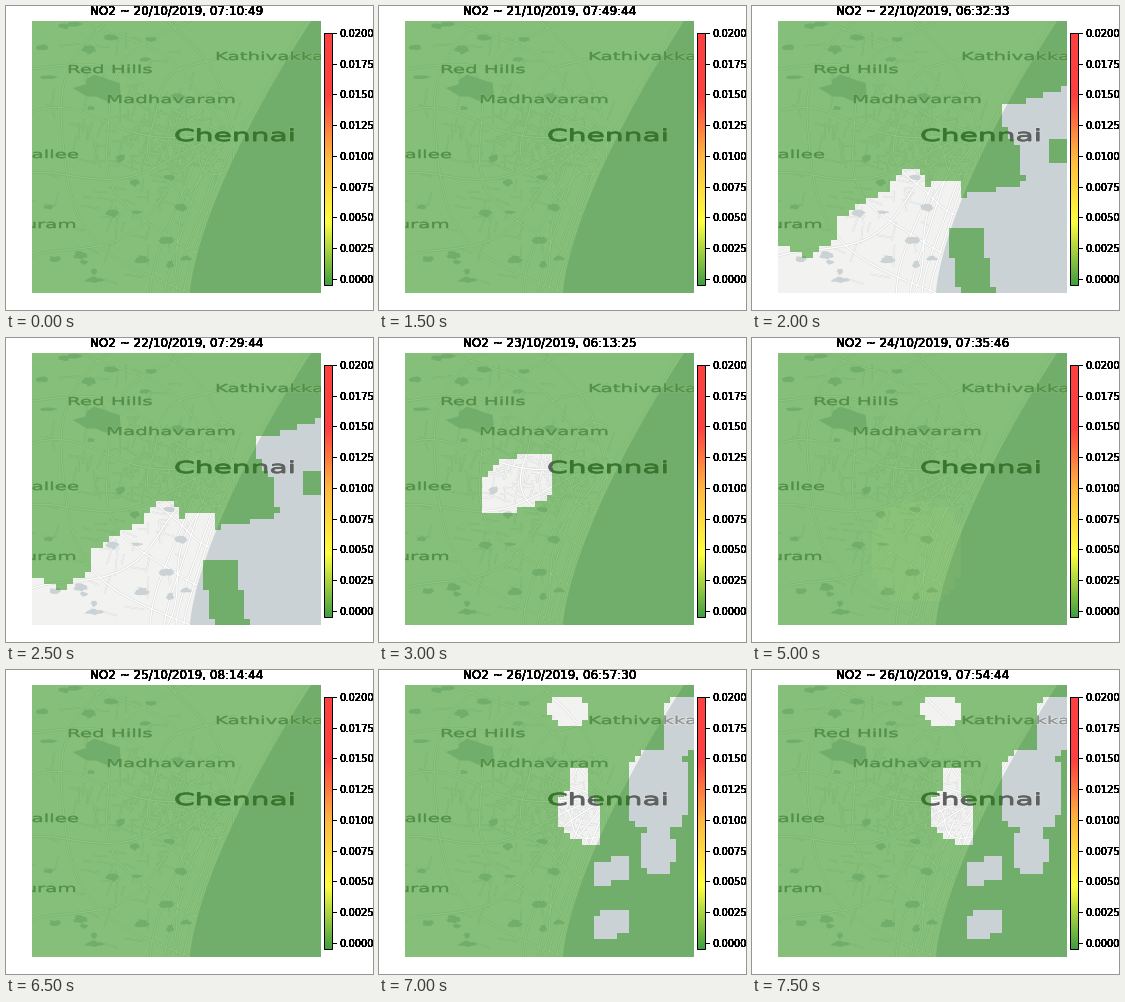
Animation of 367x304 px, one loop 8 s. Source, as a matplotlib script:

```python
import numpy as np
import matplotlib.pyplot as plt
from matplotlib.animation import FuncAnimation
from matplotlib.colors import LinearSegmentedColormap
from matplotlib.patches import PathPatch, Polygon, Rectangle
from matplotlib.path import Path
from matplotlib.textpath import TextPath
from matplotlib.transforms import Affine2D

W, H, DPI = 367, 304, 64
PT = 72 / DPI                       # points per pixel
X0, X1, Y0, Y1 = 26, 315, 15, 287   # map box
COLS, ROWS = 49, 46
VMIN, VMAX = -0.0005, 0.02
STRETCH = 1.8                       # horizontal scale of the map projection
LAND, SEA, ROAD, EDGE, GREY = "#f2f3f1", "#cad2d5", "#ffffff", "#d8dad9", "#8f9391"

plt.rcParams["font.family"] = "DejaVu Sans"
rng = np.random.default_rng(7)
cmap = LinearSegmentedColormap.from_list(
    "no2", ["green", "yellow", "orange", "red", "red"])

fig = plt.figure(figsize=(W / DPI, H / DPI), dpi=DPI, facecolor="white")
ax = fig.add_axes([0, 0, 1, 1])
ax.axis("off")
frame = Rectangle((X0, Y0), X1 - X0, Y1 - Y0, fc=LAND, ec="none", zorder=0)
ax.add_patch(frame)


def add_clipped(patch):
    ax.add_patch(patch)
    patch.set_clip_path(frame)


def area(points):
    add_clipped(Polygon(points, closed=True, fc=SEA, ec="none", zorder=2))


def road(x, y, width=1.3, z=1.5):
    for color, w, dz in ((EDGE, width + 1, 0), (ROAD, width, 0.1)):
        line, = ax.plot(x, y, color=color, lw=w * PT, zorder=z + dz)
        line.set_clip_path(frame)


def lake(x, y, rx, ry):
    a = np.linspace(0, 2 * np.pi, 14, endpoint=False)
    r = rng.uniform(0.6, 1.1, a.size)
    area(np.c_[x + rx * r * np.cos(a), y + ry * r * np.sin(a)])


def label(text, x, y, size=11, color=GREY, weight=0.4, right=False):
    path = TextPath((0, 0), text, size=size)
    path = Affine2D().scale(STRETCH, -1).transform_path(path)
    if right:
        x -= path.get_extents().x1
    path = Affine2D().translate(x, y).transform_path(path)
    add_clipped(PathPatch(path, fc=LAND, ec=LAND, lw=2 * PT, alpha=0.6, zorder=3))
    add_clipped(PathPatch(path, fc=color, ec=color, lw=weight * PT, zorder=3.1))


def coast(y):
    return 184 + 0.0357 * np.maximum(287 - y, 0) ** 1.45


# Side streets, dense in the centre and sparse outside
for n, cx, cy, sx, sy in ((140, 175, 138, 28, 24), (120, 130, 150, 55, 65)):
    for x, y in rng.normal((cx, cy), (sx, sy), (n, 2)):
        turn = rng.choice([0, np.pi / 2]) + rng.normal(0.15, 0.2)
        d = rng.uniform(3, 10) * np.array([-1, 1])
        road(x + d * np.cos(turn), y + d * np.sin(turn), 0.6, z=1)

# Main roads: spokes from the port, rings around it, lines along the shore
t = np.linspace(0, 1, 40)
for angle in np.radians(np.arange(95, 270, 22)):
    bend = angle + 0.12 * np.sin(7 * t + 3 * angle)
    road(228 + 260 * t * np.cos(bend), 128 + 230 * t * np.sin(bend))
for r in (45, 85, 130, 175):
    angle = np.pi * (0.5 + t)
    wave = r + 4 * np.sin(6 * angle + r)
    road(228 + wave * np.cos(angle), 128 + 0.95 * wave * np.sin(angle))
for gap, start in ((5, 15), (12, 165), (24, 150), (38, 160)):
    y = np.linspace(start, 287, 40)
    road(coast(y) - gap + 2 * np.sin(y / 25 + gap), y)

shore = np.linspace(Y0, Y1, 60)
area([*zip(coast(shore), shore), (X1, Y1), (X1, Y0)])
lake(94, 82, 25, 13)
for x, y in rng.uniform((30, 18), (180, 275), (26, 2)):
    lake(x, y, rng.uniform(4, 10), rng.uniform(2, 5))

label("Red Hills", 61, 67)
label("Madhavaram", 100, 97)
label("Kathivakkam", 209, 54)
label("Chennai", 168, 135, 16.5, "#5c605f", 1)
label("Poonamallee", 72, 152, right=True)
label("uram", 69, 222, right=True)

# Grid cells of the satellite product
cx, cy = np.meshgrid(X0 + (np.arange(COLS) + 0.5) * (X1 - X0) / COLS,
                     Y0 + (np.arange(ROWS) + 0.5) * (Y1 - Y0) / ROWS)


def lump(x, y, rx, ry, tilt=0):
    u, v = cx - x, cy - y
    return abs(u / rx) ** 3 + abs((v - tilt * u) / ry) ** 3 < 1


def inside(points):
    cells = np.c_[cx.ravel(), cy.ravel()]
    return Path(points).contains_points(cells).reshape(cx.shape)


def field(gap=False, raised=False):
    v = np.where(raised, 0.0003, 0.00005) + 0 * cx
    return np.ma.masked_array(v, gap | (cx < X0))


south = inside([(20, 234), (56, 252), (82, 234), (85, 213), (138, 182),
                (150, 164), (168, 164), (174, 179), (209, 173), (209, 191),
                (271, 177), (270, 150), (252, 120), (252, 101), (316, 80),
                (320, 290), (20, 290)])
south &= ~inside([(194, 220), (229, 220), (243, 290), (207, 290)])
south &= ~lump(308, 146, 11, 12)
centre = lump(139, 145, 37, 26, -0.3)
clouds = (lump(190, 41, 20, 14) | lump(199, 113, 10, 14)
          | lump(202, 147, 21, 24, 0.3) | lump(301, 55, 15, 30)
          | lump(279, 120, 31, 40) | lump(279, 180, 16, 27)
          | lump(233, 201, 20, 12, -0.2) | lump(232, 254, 20, 14, -0.2))

full = field()
fields = {(2, 0): field(south), (3, 0): field(centre), (6, 1): field(clouds),
          (4, 1): field(raised=lump(165, 215, 43, 50))}


def clock(h, m, s):
    return 3600 * h + 60 * m + s


# Each day the satellite passes earlier, until the next orbit takes over
passes = []
for day in range(7):
    for orbit in (0, 1):
        if (orbit and day < 3) or (not orbit and day > 3):
            continue
        start = clock(7, 10, 49) + day * -clock(0, 19, 8) + orbit * clock(1, 41, 29)
        slot = clock(8, 9, 44) + day * -clock(0, 20, 0) + orbit * clock(1, 45, 0)
        passes += [(day, sec, fields.get((day, orbit), full)) for sec in (start, slot)]

layer = ax.imshow(full, cmap=cmap, vmin=VMIN, vmax=VMAX, alpha=0.5,
                  extent=(X0, X1, Y1, Y0), interpolation="nearest",
                  aspect="auto", zorder=5)

# Colour bar
LEFT, RIGHT, TOP, BOTTOM = 318, 326, 27, 279
ax.imshow(np.linspace(1, 0, 256)[:, None], cmap=cmap, alpha=0.75,
          extent=(LEFT, RIGHT, BOTTOM, TOP), aspect="auto", zorder=5)
ax.add_patch(Rectangle((LEFT, TOP), RIGHT - LEFT, BOTTOM - TOP, fc="none",
                       ec="black", lw=PT, zorder=6))


def heavy_text(x, y, s, size, **kw):
    """Overprint a label so that its antialiased edges turn darker."""
    return [ax.text(x, y, s, fontsize=size * PT, zorder=7, va="baseline", **kw)
            for _ in range(12)]


for value in np.linspace(0, VMAX, 9):
    y = BOTTOM - (value - VMIN) / (VMAX - VMIN) * (BOTTOM - TOP)
    ax.plot([RIGHT + 1, RIGHT + 4], [y, y], color="black", lw=PT, zorder=6)
    heavy_text(333.5, y + 4, f"{value:.4f}", 10)

titles = heavy_text((X0 + X1) / 2, 9, "", 12, ha="center")
ax.set_xlim(0, W)
ax.set_ylim(H, 0)


def update(i):
    day, sec, data = passes[i]
    layer.set_data(data)
    time = f"{sec // 3600:02}:{sec // 60 % 60:02}:{sec % 60:02}"
    for t in titles:
        t.set_text(f"NO2 ~ {20 + day}/10/2019, {time}")
    return [layer, *titles]


anim = FuncAnimation(fig, update, frames=len(passes), interval=500,
                     repeat=True, repeat_delay=0, blit=False)
plt.show()
```
